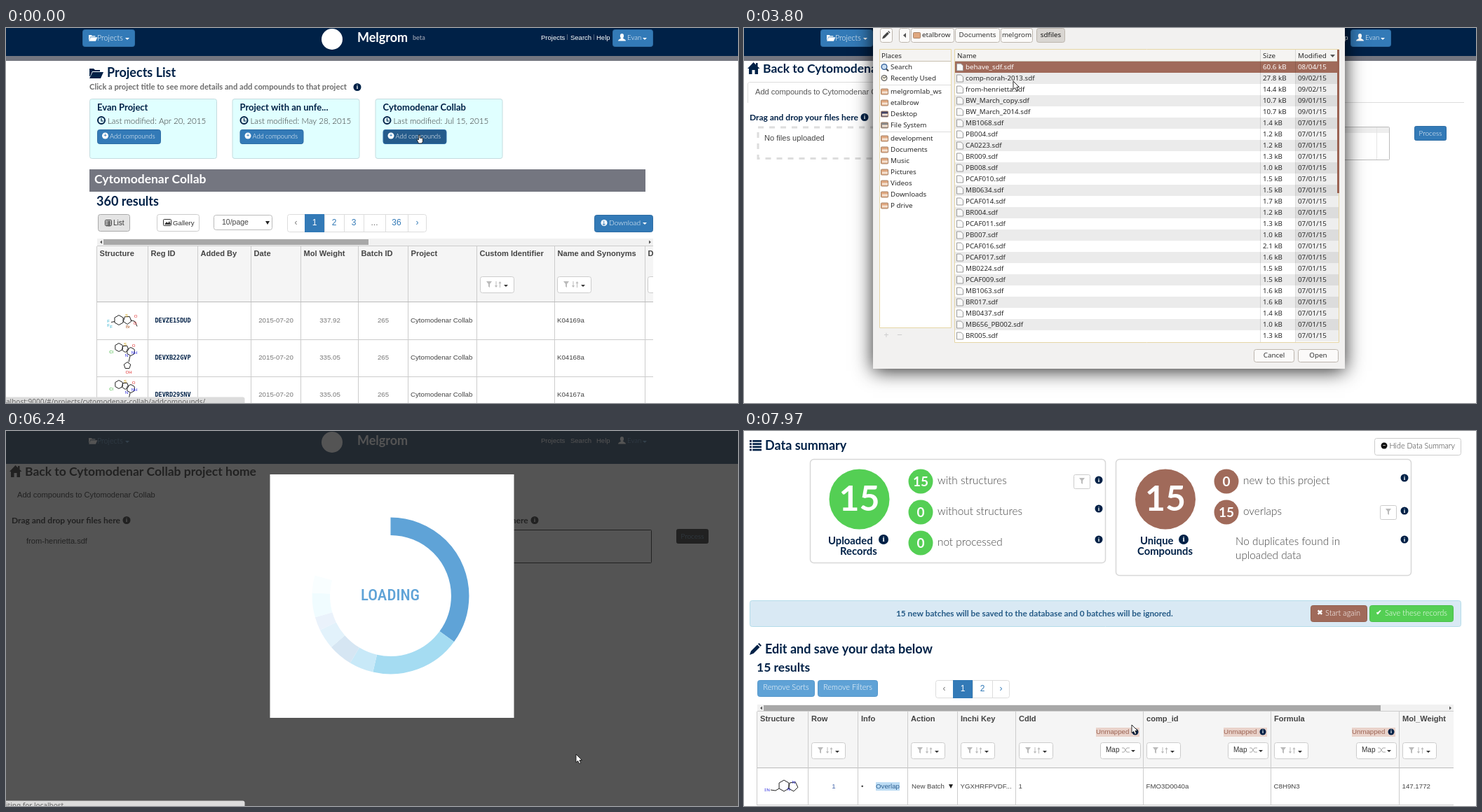
These frames come from a looping animation (1044 by 536 pixels, 8 s). An HTML page with a canvas:

```html
<!DOCTYPE html>
<html lang="en">
<head>
<meta charset="utf-8">
<title>Compound upload walkthrough</title>
<style>
html, body { margin: 0; width: 100%; height: 100%; overflow: hidden; background: #fff; }
canvas { display: block; width: 100vw; height: 100vh; }
</style>
</head>
<body>
<canvas id="stage" width="1044" height="536"></canvas>
<script>
const g = document.getElementById('stage').getContext('2d');
const W = 1044, H = 536, LOOP = 8000;
const NAVY = '#002147', BLUE = '#337ab7', SKY = '#5fa2d6', SLATE = '#747680', GREEN = '#54cf54', BROWN = '#a06a5a';
const PROJECT = 'Cytomodenar Collab', FILE = 'from-henrietta.sdf';

// Text, with y at the middle of the line
function text(s, x, y, font, color, align = 'left') {
  g.font = font; g.fillStyle = color; g.textAlign = align; g.textBaseline = 'middle';
  g.fillText(s, x, y);
}
const bold = (s, x, y, size, color = NAVY, align) => text(s, x, y, `700 ${size}px Lato, sans-serif`, color, align);
const light = (s, x, y, size, color = '#fff', align) => text(s, x, y, `300 ${size}px Lato, sans-serif`, color, align);
const arial = (s, x, y, size, color = '#444', align) => text(s, x, y, `${size}px "Liberation Sans", Arial, sans-serif`, color, align);
const arialBold = (s, x, y) => text(s, x, y, '700 11.1px "Liberation Sans", Arial, sans-serif', '#444');
const noto = (s, x, y, color = '#2a2a2a', size = 9.8, align) => text(s, x, y, `${size}px "Noto Sans", sans-serif`, color, align);

// Shapes
function fill(x, y, w, h, color) { g.fillStyle = color; g.fillRect(x, y, w, h); }
function box(x, y, w, h, color, border, r = 3, lw = 1) {
  g.beginPath(); g.roundRect(x + .5, y + .5, w - 1, h - 1, r);
  if (color) { g.fillStyle = color; g.fill(); }
  if (border) { g.strokeStyle = border; g.lineWidth = lw; g.stroke(); }
}
function line(points, color, lw = 1) {
  g.beginPath(); points.forEach(([x, y]) => g.lineTo(x, y));
  g.strokeStyle = color; g.lineWidth = lw; g.stroke();
}
const hline = (x1, x2, y, color) => fill(x1, y, x2 - x1, 1, color);
const vline = (x, y1, y2, color) => fill(x, y1, 1, y2 - y1, color);
function disc(x, y, r, color) { g.beginPath(); g.arc(x, y, r, 0, 7); g.fillStyle = color; g.fill(); }
function shape(d, x, y, color, scale = 1, outline) {
  g.save(); g.translate(x, y); g.scale(scale, scale);
  const p = new Path2D(d);
  g.fillStyle = color; g.fill(p);
  if (outline) { g.strokeStyle = outline; g.lineWidth = 1; g.stroke(p); }
  g.restore();
}

// Icons
const FOLDER = 'M0 12V1H6L8 3H15V5H4L1 12ZM4.500 6H20L16 15H0Z';
const HOUSE = 'M0 9L8.500 0L12 3.500V1H14.500V6L17.500 9H15V17H10.500V11H6.500V17H2V9Z';
const PENCIL = 'M0 17L2 11.500L11 2.500L14.500 6L5.500 15ZM12 1.500L13.500 0L17 3.500L15.500 5Z';
const PERSON = 'M5.500 0C9 0 8.500 5 7 6.500C7 7.500 11 8 11 10.500H0C0 8 4 7.500 4 6.500C2.500 5 2 0 5.500 0Z';
const FUNNEL = 'M0 0H8L5 4V9L3 7.500V4Z';
const ARROW = 'M0 0V13L3 10.500L5 15L7.500 14L5.500 9.500H9.500Z';
const HAND = 'M3 0H5V5H9L10 7V11L8 14H3L0 8L1 7L3 8Z';
const caret = (x, y, color = '#fff') => shape('M0 0H6L3 3Z', x, y, color);
function info(x, y, color = NAVY, r = 5.5) {
  disc(x, y, r, color);
  text('i', x, y + .5, `700 ${r * 1.6}px "Liberation Serif", serif`, '#fff', 'center');
}
function badge(s, x, y, color, ink) { disc(x, y, 4.5, color); bold(s, x, y, 8, ink, 'center'); }
function clock(x, y) {
  g.beginPath(); g.arc(x, y, 5, 0, 7); g.strokeStyle = NAVY; g.lineWidth = 2; g.stroke();
  line([[x, y - 3], [x, y + 1], [x + 3, y + 1]], NAVY, 1.2);
}
function bars(x, y, w, gap, color) {
  for (let i = 0; i < 4; i++) {
    fill(x, y + i * gap, gap * .7, gap * .65, color);
    fill(x + gap, y + i * gap, w - gap, gap * .65, color);
  }
}
function shuffle(x, y) {
  line([[x, y - 3], [x + 3, y - 3], [x + 7, y + 3], [x + 11, y + 3]], '#aaa');
  line([[x, y + 3], [x + 3, y + 3], [x + 7, y - 3], [x + 11, y - 3]], '#aaa');
}
function filterButton(x, y) {
  box(x, y, 49, 24, '#fff', '#ccc');
  shape(FUNNEL, x + 9, y + 7, '#bbb');
  shape('M1.500 0H2.500V6H4L2 9L0 6H1.500ZM7 9H8V3H9.500L7.500 0L5.500 3H7Z', x + 21, y + 7, '#bbb');
  caret(x + 34, y + 12, '#333');
}
function pager(edges, y, h, labels) {
  const last = edges.length - 1;
  box(edges[0], y, edges[last] - edges[0], h, '#fff', '#ddd');
  labels.forEach((s, i) => {
    const x = edges[i], w = edges[i + 1] - x;
    if (s === '1') fill(x, y, w, h, BLUE); else if (i) vline(x, y, y + h, '#ddd');
    arial(s, x + w / 2, y + h / 2, 12, s === '1' ? '#fff' : s === '...' || s === '‹' ? '#777' : BLUE, 'center');
  });
}
function scrollbar(x1, x2, y, from, to) {
  fill(x1, y, x2 - x1, 10, '#f1f1f1');
  fill(from, y + 1, to - from, 8, '#a8a8a8');
  shape('M3 0V5L0 2.500Z', x1 + 4, y + 2.5, '#555');
  shape('M0 0V5L3 2.500Z', x2 - 6, y + 2.5, '#555');
}
function ring(x, y, r, n, turn = 0) {
  const corners = Array.from({ length: n + 1 }, (_, i) => {
    const a = turn + i * 2 * Math.PI / n;
    return [x + r * Math.sin(a), y - r * Math.cos(a)];
  });
  line(corners, '#222');
}
const atom = (s, x, y, color) => arial(s, x, y, 6, color, 'center');

// Site header; the dimmed one loses its buttons and strip
function header(dim) {
  fill(0, 0, W, 47, NAVY);
  if (!dim) {
    fill(0, 40, W, 7, SLATE);
    box(109, 2, 75, 25, BLUE, '#2e6da4'); box(865, 2, 58, 25, BLUE, '#2e6da4');
    bold('beta', 580, 14, 9, '#8a93a5');
    vline(800, 9, 17, '#56657d'); vline(838, 9, 17, '#56657d');
  }
  const ink = dim ? SKY : '#fff';
  shape(FOLDER, 118, 9.5, '#fff', .62); light('Projects', 130, 14.5, 10.7, ink); caret(170, 14, ink);
  shape(PERSON, 873, 8, '#fff'); light('Evan', 886, 14.5, 9.8, ink); caret(908, 14, ink);
  disc(465, 16, 15, '#fff');
  bold('Melgrom', 501, 15, 18, '#fff');
  arial('Projects', 763, 14, 9.5, '#fff'); arial('Search', 805, 14, 9.5, '#fff'); arial('Help', 842, 14, 9.5, '#fff');
}
function status(s, y = 527) {
  box(-4, y, 345, 20, '#dcdcdc'); noto(s, 0, y + 8, '#666', 10);
}

// Project list
function card(x, title, date, hover) {
  box(x, 101, 182, 86, '#e0ffff', '#c4dcdf');
  bold(title, x + 11, 114, 13);
  clock(x + 17, 132); light('Last modified: ' + date, x + 26, 133, 11.6, '#333');
  box(x + 11, 145, 91, 21, hover ? '#255b8b' : BLUE, '#2e6da4');
  badge('+', x + 22.5, 154, '#fff', BLUE); light('Add compounds', x + 29, 155, 9.2);
}
function bromide(y) {
  ring(161, y - 1, 7, 6); ring(173, y - 1, 6, 5, .6);
  line([[150, y + 2], [155, y + 1]], '#222'); line([[178, y - 1], [184, y + 1], [187, y + 8]], '#222');
  atom('S', 172, y - 7, '#c90'); atom('F', 146, y + 1, '#2ac'); atom('F', 150, y + 9, '#2ac'); atom('F', 146, y + 7, '#2ac');
  atom('Br', 174, y + 9, '#a52'); atom('O', 185, y - 6, '#d22'); atom('O', 184, y + 4, '#d22');
}
function chloride(y) {
  ring(161, y - 15, 6, 6); ring(170, y - 13, 5, 5, .6); ring(178, y - 9, 6, 6);
  line([[177, y - 3], [175, y + 6]], '#222'); ring(173, y + 11, 5, 5);
  atom('Cl', 150, y - 8, '#2a2'); atom('S', 170, y - 19, '#c90'); atom('O', 182, y - 17, '#d22');
  atom('NH', 183, y - 7, '#22d'); atom('N', 172, y - 3, '#22d'); atom('OH', 175, y + 21, '#d22');
}
function projectList(t) {
  shape(FOLDER, 119, 57, NAVY); bold('Projects List', 144, 65, 18);
  bold('Click a project title to see more details and add compounds to that project', 119, 85, 11.2, '#6c6c6c');
  info(501, 84.5);
  card(119, 'Evan Project', 'Apr 20, 2015');
  card(322.5, 'Project with an unfe...', 'May 28, 2015');
  card(526.5, PROJECT, 'Jul 15, 2015', true);
  fill(119, 202, 793, 32, SLATE); bold(PROJECT, 126, 217, 17.5, '#fff');
  bold('360 results', 129, 249, 18);
  box(131, 266, 46, 25, '#e4e4e4', '#aaa'); box(141, 274, 10, 9, null, '#333', 1); bars(143, 276, 6, 2, '#333'); arial('List', 153, 279, 10, '#333');
  box(215, 266, 61, 25, '#fff', '#ccc'); box(224, 273, 12, 10, null, '#333', 1); shape('M0 5L3 1L5 3L7 0L9 5Z', 226, 276, '#333'); arial('Gallery', 238, 279, 9.7, '#333');
  box(296, 267, 84, 22, '#fff', '#bbb'); arial('10/page', 308, 278, 10.5); shape('M0 0H6L3 5Z', 370, 276, '#222');
  pager([401, 426, 454, 482, 510, 541, 573, 600], 266, 26, ['‹', '1', '2', '3', '...', '36', '›']);
  box(839, 267, 84, 25, BLUE, '#2e6da4'); badge('↓', 853, 278.5, '#fff', BLUE); light('Download', 860, 279, 10.2); caret(908, 278);

  g.save(); g.beginPath(); g.rect(129, 300, 794, 236); g.clip();
  scrollbar(130, 923, 301, 139, 517);
  fill(130, 312, 793, 80, '#f5f5f5');
  const cols = [130, 203, 274, 350, 421, 503, 574, 672, 783, 912];
  ['Structure', 'Reg ID', 'Added By', 'Date', 'Mol Weight', 'Batch ID', 'Project', 'Custom Identifier', 'Name and Synonyms', 'D']
    .forEach((s, i) => { arialBold(s, cols[i] + 3.5, 323); vline(cols[i] - 1, 312, H, '#ccc'); });
  [676, 786, 915].forEach(x => filterButton(x, 355));
  hline(130, 923, 311, '#ccc'); hline(130, 923, 391, '#bbb'); hline(130, 923, 445, '#ccc'); hline(130, 923, 498, '#ccc');
  [['DEVZE15DUD', '337.92', 'K04169a'], ['DEVXB22GVP', '335.05', 'K04168a'], ['DEVRD29SNV', '335.05', 'K04167a']].forEach(([id, mass, name], i) => {
    const y = 418.5 + 53 * i;
    i ? chloride(y) : bromide(y);
    text(id, 238, y, '700 8.5px "DejaVu Sans Mono", monospace', NAVY, 'center');
    arial('2015-07-20', 385, y, 9.7, '#777', 'center'); arial(mass, 462, y, 9.7, '#777', 'center');
    arial('265', 538, y, 9.7, '#777', 'center'); arial(PROJECT, 577, y, 9.7); arial(name, 786, y, 9.7);
  });
  g.restore();
  status(t < 600 ? 'alhost:9000/#/projects/cytomodenar-collab/addcompounds/' : 'iting for the server reply...');
}

// Upload page
function pageTop(ink, tab = true) {
  shape(HOUSE, 5, 49, ink);
  bold(`Back to ${PROJECT} project home`, 27, 59, 17.5, ink);
  arial(`Add compounds to ${PROJECT}`, 16, 92, 11.1, tab ? '#555' : '#000');
  if (!tab) return;
  hline(228, 1027, 106, '#ddd');
  line([[5.5, 107], [5.5, 79], [7.5, 77.5], [225.5, 77.5], [227.5, 79], [227.5, 107]], '#ddd');
}
function upload(alpha, file, pressed, dim) {
  const q = (alpha - .35) / .65, ink = dim ? '#000' : `rgb(0 ${150 - 117 * q} ${210 - 139 * q})`;
  g.save(); g.globalAlpha = alpha;
  pageTop(ink, !dim);
  bold('Drag and drop your files here', 8, 128.5, 12, ink); info(172, 127.5, ink);
  bold('Paste your SMILES or Standard InChIs here', 516, 128.5, 12, ink); info(754, 127.5, ink);
  arial(file || 'No files uploaded', 29, 158, 11.1, dim ? '#000' : '#444');
  box(537, 141, 384, 48, '#fff', dim ? '#000' : '#bbb', 1);
  box(956, 140, 46, 21, dim ? '#000' : BLUE, dim ? '#000' : '#2e6da4', 2);
  light('Process', 979, 150.5, 10, dim ? SKY : '#fff', 'center');
  if (!dim) {
    g.setLineDash([8, 8]); g.strokeStyle = '#ddd'; g.lineWidth = 3; g.strokeRect(20, 142, 403, 44.5); g.setLineDash([]);
    box(449, 140, 46, 21, pressed ? '#255b8b' : BLUE, '#2e6da4', 2); arial('Process', 472, 151, 8.5, '#fff', 'center');
    fill(538, 142, 382, 8, '#eee'); fill(538, 142, 27, 46, '#ebebeb'); vline(902, 142, 188, '#e4e4e4');
    text('1', 554, 146, '8px "DejaVu Sans Mono", monospace', '#777', 'center'); vline(568, 142, 150, '#888');
  }
  g.restore();
}

// File chooser
const PLACES = ['Search', 'Recently Used', 'melgromlab_ws', 'etalbrow', 'Desktop', 'File System', 'development', 'Documents', 'Music', 'Pictures', 'Videos', 'Downloads', 'P drive'];
const FILES = `behave_sdf 60.6 08/04|comp-norah-2013 27.8 09/02|from-henrietta 14.4 09/02|BW_March_copy 10.7 09/01|BW_March_2014 10.7 09/01
MB1068 1.4|PB004 1.2|CA0223 1.2|BR009 1.3|PB008 1.0|PCAF010 1.5|MB0634 1.5|PCAF014 1.7|BR004 1.2|PCAF011 1.3|PB007 1.0
PCAF016 2.1|PCAF017 1.6|MB0224 1.5|PCAF009 1.5|MB1063 1.6|BR017 1.6|MB0437 1.4|MB656_PB002 1.0|BR005 1.3`.split(/[|\n]/).map(s => s.split(' '));
const gtkButton = (x, y, w, h, label, color = '#fbfaf9', ink = '#333') => {
  box(x, y, w, h, color, '#bdb6ae'); noto(label, x + w / 2, y + h / 2, ink, 9.8, 'center');
};
function places(bottom) {
  box(193, 30, 103, bottom - 30, '#fff', '#e6d6a6', 0);
  fill(194, 31, 101, 16, '#f5f4f2'); hline(194, 295, 47, '#c8c0b0'); noto('Places', 196, 40);
  g.save(); g.beginPath(); g.rect(193, 30, 103, bottom - 30); g.clip();
  PLACES.forEach((s, i) => {
    const y = 56.5 + 16 * i + (i > 1 ? 3 : 0) + (i > 5 ? 3 : 0);
    if (i < 2) {
      disc(200, y - 1, 4.5, i ? '#666' : '#2c5a96'); disc(200, y - 1, 3.2, i ? '#f0ecdc' : '#c8dcf0');
      line(i ? [[198, y - 2], [200, y - 1], [203, y - 3]] : [[203, y + 2], [206, y + 5]], '#444', i ? 1 : 2);
    } else {
      box(195, y - 5, 11, 9, i === 5 ? '#888' : i === 4 ? '#446' : '#e0a880', '#a88468', 1);
      fill(197, y - 1, 8, 3, '#f4e2d2');
    }
    noto(s, 209, y);
  });
  hline(194, 295, 81, '#ddd'); hline(194, 295, 148, '#ddd');
  g.restore();
}
function fileList(selected) {
  box(300, 30, 549, 420, '#fff', '#e6d6a6', 0);
  fill(301, 31, 547, 17, '#f5f4f2'); hline(301, 848, 47, '#c8c0b0');
  noto('Name', 304, 40); noto('Size', 740, 40); noto('Modified', 790, 40); shape('M0 0H7L3.500 4Z', 836, 38, '#555');
  FILES.forEach(([name, size, date = '07/01'], i) => {
    const y = 48 + 16 * i, on = i === selected, ink = on ? '#fff' : '#2a2a2a';
    fill(301, y, 547, 16, on ? BROWN : i % 2 ? '#ebebeb' : '#fff');
    if (!on) fill(787, y, 61, 16, i % 2 ? '#dcdcdc' : '#eee');
    shape('M0 0H6L9 3V10H0Z', 303.5, y + 3, '#fafafa', 1, '#999');
    noto(name + '.sdf', 316, y + 8.5, ink); noto(size + ' kB', 740, y + 8.5, ink); noto(date + '/15', 790, y + 8.5, ink);
  });
  vline(736, 31, 449, 'rgba(0,0,0,.12)'); vline(786, 31, 449, 'rgba(0,0,0,.12)');
  fill(846, 31, 3, 205, '#9b6353');
}
function chooser(t) {
  g.save(); g.shadowColor = 'rgba(0,0,0,.85)'; g.shadowBlur = 26; g.shadowOffsetY = 3;
  fill(184, -40, 673, 527, '#f2f1f0'); g.restore();
  if (t < 2600) return;
  gtkButton(194, 0, 18, 21, ''); shape(PENCIL, 197, 4, '#444', .68);
  if (t < 2720) {
    places(89); fill(300, 30, 24, 59, '#fff'); hline(300, 324, 30, '#d8c49a'); vline(300, 30, 89, '#e6d6a6');
    return;
  }
  places(429); fileList(t < 4100 ? 0 : 2);
  gtkButton(221, 0, 16, 21, ''); shape('M4 0V7L0 3.500Z', 227, 7, '#555');
  gtkButton(238, 0, 62, 21, ''); box(241, 6, 11, 9, '#e0a880', '#a88468', 1); noto('etalbrow', 254, 10.5);
  gtkButton(301, 0, 64, 21, 'Documents'); gtkButton(366, 0, 46, 21, 'melgrom'); gtkButton(417, 0, 41, 21, 'sdfiles', '#d9d6d2', '#111');
  noto('+', 203, 439, '#ccc', 13, 'center'); noto('−', 222, 439, '#ccc', 13, 'center');
  gtkButton(727, 459, 58, 19, 'Cancel');
  const down = t > 4800;
  gtkButton(790, 459, 58, 19, 'Open', down ? '#d2986c' : '#fbfaf9', down ? '#8a5b3c' : '#333');
}

// Loading overlay
const ARCS = [[0, '#5fa3d7'], [126, '#a5dcf2'], [193, '#c8e9f8'], [211, '#d6e6f3'], [229, '#e2f2fb'], [244, '#eaf2fb'], [254, '#f0fcff'], [272, '#f9feff'], [285]];
function loading(alpha, turn) {
  g.save(); g.globalAlpha = alpha;
  fill(0, 0, W, H, 'rgba(42,42,42,.8)');
  fill(376.5, 62, 348, 348, '#fff');
  g.lineWidth = 25.5;
  ARCS.slice(0, -1).forEach(([from, color], i) => {
    const angle = d => (d + turn - 90) * Math.PI / 180;
    g.beginPath(); g.arc(548.5, 235.5, 99.2, angle(from), angle(ARCS[i + 1][0])); g.strokeStyle = color; g.stroke();
  });
  // The size follows from whichever condensed face is present
  const face = size => `500 condensed ${size}px "Roboto Condensed", "Open Sans Condensed", Roboto, sans-serif`;
  g.font = face(100);
  text('LOADING', 548, 235.5, face(8400 / g.measureText('LOADING').width), '#5fa3d7', 'center');
  g.restore();
}

// Summary page
function counter(n, x, y, r, size, color) { disc(x, y, r, color); bold(n, x, y + 1, size, '#fff', 'center'); }
function funnelButton(x, y) { box(x, y, 24, 21, '#fff', '#ccc', 2); shape(FUNNEL, x + 8, y + 5, '#bbb'); }
function resultTable(full) {
  const right = full ? 1012 : W, rowY = full ? 619 : 525;
  const cols = [19, 92, 163, 234, 305, 388, 570, 752, 935];
  g.save(); g.beginPath(); g.rect(18, 490, right - 18, 170); g.clip();
  if (full) {
    scrollbar(19, 1012, 502, 28, 908);
    fill(19, 512, 993, 81, '#f5f5f5'); hline(19, 1012, 511, '#ccc'); hline(19, 1012, 592, '#bbb'); hline(19, 1012, 645, '#ccc');
    ['Structure', 'Row', 'Info', 'Action', 'Inchi Key', 'CdId', 'comp_id', 'Formula', 'Mol_Weight'].forEach((s, i) => {
      arialBold(s, cols[i] + 4, 523);
      if (i && i !== 2) filterButton(cols[i] + 4, 556);
      if (i < 5 || i > 7) return;
      const end = cols[i + 1];
      fill(end - 68, 535, 62, 13, '#e9d2ca'); arial('Unmapped', end - 68, 541.5, 9.7, '#9b6353'); info(end - 12, 541, NAVY, 4.5);
      box(end - 62, 556, 58, 24, '#fff', '#ccc'); arial('Map', end - 54, 567.5, 10, '#333'); shuffle(end - 31, 567); caret(end - 18, 567, '#333');
    });
  } else hline(19, W, 498, '#bbb');
  cols.forEach(x => vline(x - 1, full ? 512 : 498, full ? 646 : 560, '#ccc'));
  ring(57, rowY - 1, 8, 6); ring(70, rowY, 7, 5, .5);
  line([[38, rowY + 5], [45, rowY + 6], [50, rowY + 3]], '#222');
  atom('N', 71, rowY - 6, '#22d'); atom('N', 64, rowY + 4, '#22d'); atom('≡N', 33, rowY + 5, '#22d');
  arial('1', 128, rowY, 9.7, '#46a', 'center'); arial('•', 167, rowY, 9.7);
  fill(188, rowY - 6, 34, 12, '#bcdcf4'); arial('Overlap', 188, rowY, 9.7, '#2a5f92');
  arial('New Batch', 239, rowY, 9.7); shape('M0 0H6L3 6Z', 292, rowY - 3, '#222');
  ['YGXHRFPVDF...', '1', 'FMO3D0040a', 'C8H9N3', '147.1772'].forEach((s, i) => arial(s, cols[i + 4] + 3.5, rowY, 9.7));
  g.restore();
  if (!full) { fill(0, 533.5, 973, 3, '#a8a8a8'); fill(973, 533.5, 71, 3, '#eee'); }
}
function summary(t) {
  const n = t < 6880 ? 0 : 15;
  pageTop(NAVY);
  bars(8, 124, 17, 4.2, NAVY); bold('Data summary', 30, 133, 18);
  box(899, 121, 124, 25, '#fff', '#ccc'); badge('−', 913, 132, '#111', '#fff'); light('Hide Data Summary', 920.5, 133, 10.8, '#333');
  box(94, 151, 422, 149, '#fff', '#d8d8d8', 5, 1.5); box(530, 151, 422, 167, '#fff', '#d8d8d8', 5, 1.5);
  counter(n, 164.5, 208.5, 43, 50, GREEN); counter(n, 601, 208.5, 43, 50, BROWN);
  [[n, 'with structures'], [0, 'without structures'], [0, 'not processed']].forEach(([value, label], i) => {
    counter(value, 252, 183 + 44 * i, 17.5, 19, GREEN); light(label, 276, 182 + 44 * i, 15.3, '#444');
  });
  [[0, 'new to this project'], [n, 'overlaps']].forEach(([value, label], i) => {
    counter(value, 688, 183 + 44 * i, 17.5, 19, BROWN); light(label, 712, 182 + 44 * i, 15.3, '#444');
  });
  light('No duplicates found in', 701, 269, 15.3, '#444'); light('uploaded data', 701, 289, 15.3, '#444');
  funnelButton(470, 173); funnelButton(907, 217);
  [181, 222, 266].forEach(y => info(506, y)); [178, 225, 266].forEach(y => info(942, y));
  bold('Uploaded', 120, 268, 14.8); bold('Records', 137, 283, 14.8); info(199, 266, NAVY, 7);
  bold('Unique', 565, 268, 14.8); bold('Compounds', 561, 283, 14.8); info(627, 266, NAVY, 7);
  box(8, 353, 1015, 38, '#d9e9f4', '#b4dcea');
  bold(`${n} new batches will be saved to the database and 0 batches will be ignored.`, 217, 372, 11.8, '#245a86');
  box(808, 360, 81, 24, BROWN, '#93604f'); bold('✖', 817, 371, 10, '#fff'); light('Start again', 829, 372, 11);
  box(892, 360, 120, 24, GREEN, '#48c048'); bold('✔', 901, 371, 10, '#fff'); light('Save these records', 914, 372, 11);
  shape(PENCIL, 8, 414, NAVY); bold('Edit and save your data below', 30, 424, 18); bold(n + ' results', 18, 450, 17.5);
  box(19, 467, 82, 24, SKY, '#5597cb'); light('Remove Sorts', 60, 478, 11, '#fff', 'center');
  box(105, 467, 86, 24, SKY, '#5597cb'); light('Remove Filters', 148, 478, 11, '#fff', 'center');
  pager([273, 298, 326, 354, 379], 467, 26, ['‹', '1', '2', '›']);
  if (n) resultTable(t >= 7400);
}

// Motion
const ramp = (t, a, b) => Math.min(1, Math.max(0, (t - a) / (b - a)));
const ease = (t, a, b) => { const p = ramp(t, a, b); return p * p * (3 - 2 * p); };
const MOVES = [
  [390, 890, 583, 163], [1450, 2100, 470, 153], [2400, 2550, 468, 149], [3100, 3550, 384, 76], [3800, 3950, 379, 89],
  [4360, 4800, 813, 462], [6880, 7340, 562, 398], [7400, 7500, 553, 420]
];
function pointer(t) {
  let x = 590, y = 153;
  for (const [a, b, toX, toY] of MOVES) { const p = ease(t, a, b); x += (toX - x) * p; y += (toY - y) * p; }
  if (t < 1360 || (t > 2050 && t < 2550)) shape(HAND, x - 4, y, '#fff', .85, '#111');
  else if (t < 1700) {
    line([[x - 3, y - 6], [x + 3, y - 6]], '#333', 1.5); line([[x, y - 6], [x, y + 6]], '#333', 2); line([[x - 3, y + 6], [x + 3, y + 6]], '#333', 1.5);
  } else shape(ARROW, x, y, '#fff', .9, '#111');
}

function draw(t) {
  const dim = t >= 5050 && t < 6570;
  fill(0, 0, W, H, '#fff');
  g.save();
  g.translate(0, -Math.round(111 * ease(t, 7640, 7970)));
  header(dim);
  if (t < 1360) projectList(t);
  else if (t < 6570) {
    upload(.35 + .65 * ramp(t, 1400, 1800), t >= 5000 && FILE, t >= 2200 && t < 2400, dim);
    if (t < 2000) status('iting for the server reply...');
  } else {
    g.globalAlpha = .4 + .6 * ramp(t, 6570, 6670);
    summary(t);
  }
  g.restore();
  if (t >= 2550 && t < 5000) chooser(t);
  if (dim) {
    loading(ramp(t, 5050, 5380), 90 * (1 - ramp(t, 5870, 6240)));
    if (t >= 5930) status('iting for localhost...', 528);
  }
  pointer(t);
}

const start = performance.now();
(function tick() {
  draw((performance.now() - start) % LOOP);
  requestAnimationFrame(tick);
})();
</script>
</body>
</html>
```
